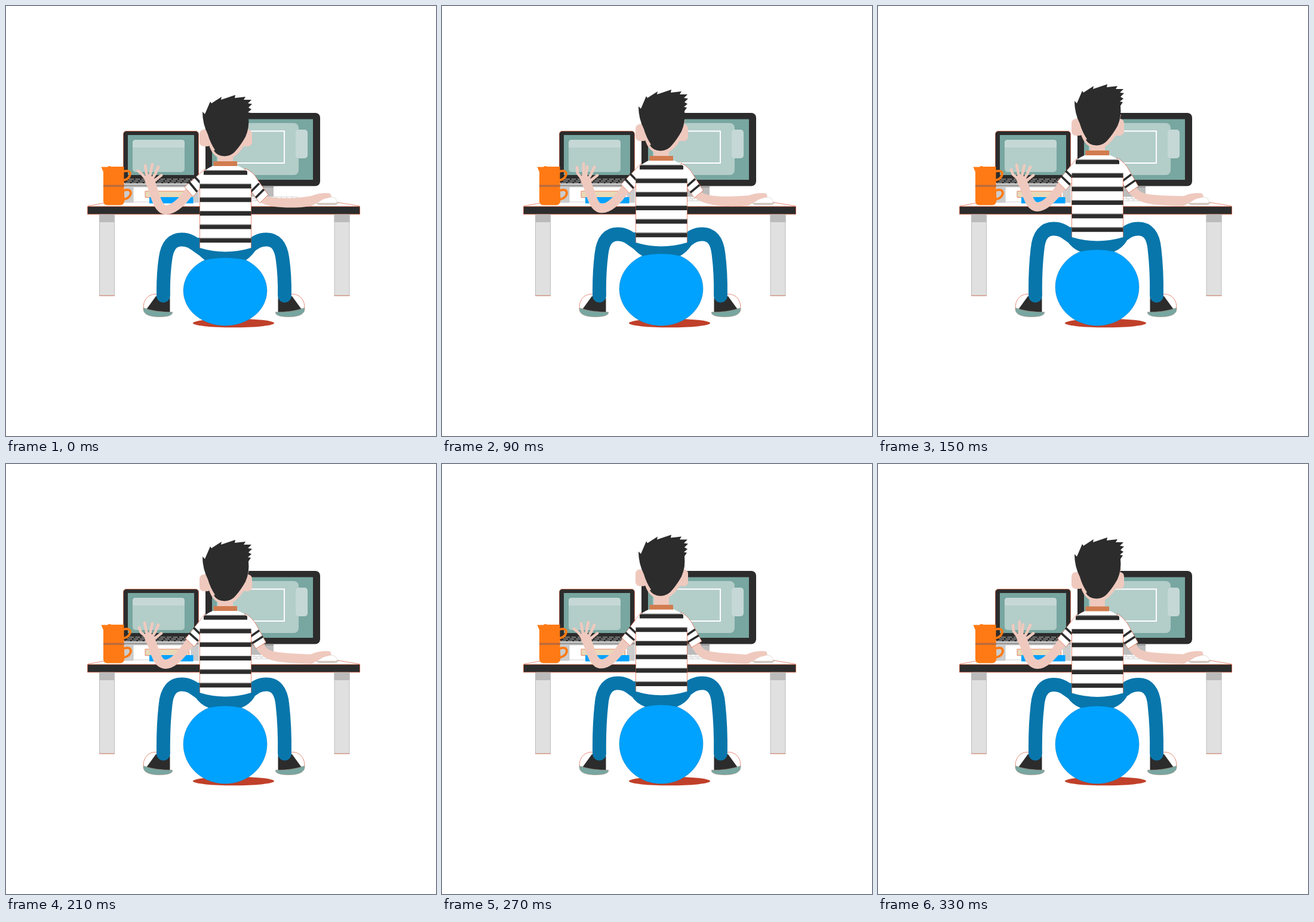
Animation, 720 px wide and 720 px high, one loop 0.36 s. Source, as an HTML page:

```html
<!DOCTYPE html>
<html lang="en">
<head>
<meta charset="utf-8">
<title>Desk bounce</title>
<style>
  html, body { margin: 0; width: 100%; height: 100%; overflow: hidden; background: #fff; }
  svg { display: block; width: 100vw; height: 100vh; }
  .ink { fill: #2c2c2c; }
  .skin { fill: #efc9be; }
  .teal { fill: #78a6a0; }
  .pane { fill: #b3cdc9; }
  .bar { fill: #c5d8d6; }
  .denim { fill: #0876ab; }
  .white { fill: #fff; }
  .rim { stroke: #dd5a3a; stroke-width: .7; }
  .line { fill: none; }
  .limb { fill: none; stroke: #efc9be; stroke-width: 15.4; }
  .leg { fill: none; stroke: #0876ab; stroke-width: 22.8; stroke-linecap: round; }
  .cuff { fill: none; stroke: #2c2c2c; stroke-width: 3.6; }
  .finger { fill: none; stroke: #efc9be; stroke-width: 4.7; stroke-linecap: round; stroke-linejoin: round; }
</style>
</head>
<body>
<svg viewBox="0 0 720 720">
  <defs>
    <g id="post">
      <path fill="#e0e0e0" stroke="#aaa" stroke-width=".7" d="M156.5 349H181.5V485H156.5Z"/>
      <path fill="#bbb" d="M156 349H182V362H156Z"/>
      <path class="line rim" d="M156 485H182"/>
    </g>
    <g id="shoe">
      <path class="white rim" d="M230.5 508C228 491 241 480 254 483L237 509Z"/>
      <path class="ink" d="M235 508L251 486L274.5 489V514Q255 515 235 508Z"/>
      <path fill="#78a6a0" stroke="#a58c7c" stroke-width=".6" d="M230 505.5Q252 513 278.5 512.5C280 518 270 520.5 258 520.5C241 520.5 229 517 230 505.5Z"/>
    </g>
    <path id="shirtShape" d="M349 267C339 270 329 277 324.5 285V405Q367 418 410.5 405V285C406 277 396 270 386 267Z"/>
    <clipPath id="shirtClip"><use href="#shirtShape"/></clipPath>
  </defs>

  <!-- monitor -->
  <rect class="ink" x="334" y="179" width="192" height="122.5" rx="8"/>
  <path class="teal" d="M345 189.5H514V291H345Z"/>
  <rect class="pane" x="353" y="196" width="137" height="87" rx="8"/>
  <rect class="bar" x="485" y="207" width="20" height="48" rx="5"/>
  <path class="line" stroke="#fff" stroke-width="1.9" d="M372 209.5H466V263H372Z"/>
  <path fill="#bbb" d="M409 301H448V320H409Z"/>
  <path fill="#999" d="M409 301H448V304H409Z"/>

  <!-- laptop -->
  <rect class="ink rim" x="196.5" y="209.5" width="126" height="88" rx="5"/>
  <path class="teal" d="M204 216H315V283H204Z"/>
  <rect class="pane" x="212" y="224" width="87" height="54" rx="5"/>
  <path class="bar" d="M212 237V229Q212 224 217 224H294Q299 224 299 229V237Z"/>
  <path class="line" stroke="#ddd" stroke-width=".9" stroke-dasharray="8 2.5" d="M206 290H318M203 293H321M200 296H322"/>
  <path fill="#ccc" d="M197 297H323V300H197Z"/>
  <path fill="#999" d="M197 299.5H323V302.5H197Z"/>

  <!-- stand and books -->
  <path fill="#ccc" d="M198 303H213V330H198ZM310 303H323V331H310Z"/>
  <path class="white" stroke="#bbb" stroke-width=".7" d="M213 303H310V328H213Z"/>

  <!-- desk -->
  <path class="white" d="M137 335L166 329.5H556L592 335Z"/>
  <path class="line rim" d="M137 335L164 330M556 329L592 335"/>
  <path class="ink rim" d="M136.5 335.7H592.5V348.7H136.5Z"/>
  <use href="#post"/>
  <use href="#post" x="393.5"/>
  <path fill="#e9d9b8" class="rim" d="M233 310H306.5V320.5H233Z"/>
  <path fill="#00a2ff" d="M240 320H313.5V330.5H240Z"/>

  <!-- keyboard and mouse -->
  <path fill="#ddd" d="M405 319H488L494 327H405Z"/>
  <path class="line" stroke="#fff" stroke-width="2" stroke-dasharray="7 2" d="M408 321H488M411 324.5H490"/>
  <path fill="#cfc3ba" d="M519 328H557Q557 333 549 333H527Q519 333 519 328Z"/>
  <path class="white" stroke="#d9cfc8" stroke-width=".7" d="M521 329Q526 320 543 320Q555 320 554 330H521Z"/>

  <!-- cups -->
  <g fill="none" stroke="#ff7a14" stroke-width="3.8">
    <path d="M196 277Q208 274 208 281Q207 290 196 292"/>
    <path d="M197 309Q209 305 209 314Q207 322 197 324"/>
  </g>
  <path fill="#ff7a14" d="M159.5 269.5H170Q173 267 176 269H197.5V300L198.5 325Q198 333.5 191 333.5H170Q163.5 333.5 163 327V278Z"/>
  <path fill="#bd6a3c" d="M163 299.5H198V303H163Z"/>

  <!-- ball and legs -->
  <ellipse cx="381" cy="531" rx="68" ry="7.3" fill="#c0402a"/>
  <use href="#shoe"/>
  <use href="#shoe" transform="matrix(-1 0 0 1 730 0)"/>
  <g id="legs">
    <path class="leg"/>
    <path class="leg" transform="matrix(-1 0 0 1 730 0)"/>
  </g>
  <ellipse id="ball" cx="367" rx="70" fill="#00a2ff" stroke="#1c86c4" stroke-width=".6"/>
  <path id="hips" class="denim"/>

  <!-- arms -->
  <path id="armL" class="limb"/>
  <path class="skin" d="M234 298L231 288Q232 283 238 282Q244 282 246 289L249 294L247 300L238 303Z"/>
  <path id="hand" class="finger"/>
  <path id="armR" class="skin"/>
  <path class="skin" d="M506 321C522 312 538 313 543 314L545 319.5C540 322 532 322 526 327L512 334.5Z"/>
  <path id="sleeveL" class="white rim"/>
  <path id="cuffL" class="cuff"/>
  <path id="sleeveR" class="white rim"/>
  <path id="cuffR" class="cuff"/>

  <!-- head -->
  <g id="head">
    <path class="skin" d="M355 246H380V274H355Z"/>
    <rect class="skin" x="324" y="207" width="20" height="28" rx="7"/>
    <rect class="skin" x="392" y="207" width="20" height="28" rx="7"/>
    <path class="skin" d="M336 208L340 233Q345 250 358 255H377Q391 248 399 233L407 200Z"/>
    <path class="ink" d="M329 177L333 181L342 160L344 163L361 152L360 157L384 149L383 154L401 152L398 157L411 157L405 163L412 164L406 170L411 173L405 178L410 179L406 185Q408 203 401 219Q393 233 385 242Q378 251 366 251.5Q353 251 348 242L350 241Q342 229 338 215Q329 197 329 177Z"/>
  </g>

  <!-- shirt -->
  <g id="shirt">
    <use href="#shirtShape" class="white"/>
    <path class="line rim" d="M324.5 303V405M410.5 303V405"/>
    <g clip-path="url(#shirtClip)" id="stripes"></g>
    <path fill="#d17c4f" d="M347.5 260H387V268H347.5Z"/>
  </g>
</svg>
<script>
const STEP = 30;
const rise = [0, 2, 4.7, 9, 13.3, 18, 20.3, 22, 23.4, 24.2, 23.4, 21.5];
const headRise = [0, 2, 4.7, 9, 13.3, 18, 20.3, 22, 27, 30.5, 29, 26];
const pose = [0, 0, 0, 1, 1, 2, 2, 2, 2, 0, 0, 1];
const thumb = "M246 294L253 289L260 283.5M245 289L250 281L255 269.5";
const fingers = [
  "M234 289L227 281L221 276M236 285L233 267M241 285L245 265",
  "M234 289L227 280L226 270M237 285L237 264M241 285L243 269",
  "M234 289L226 282L223 274M236 285L232 266M241 285L245 267"
].map(d => d + thumb);

// Each pair holds the low and the high pose.
const pairs = {
  armL: ["M308 309C291 335 276 341.3 268 341.3C254 341.3 250 318 241 291",
         "M309 296C288 327 276 334.6 267 334.6C253 334.6 250 315 241 291"],
  armR: ["M437 319C450 322 490 324 520 316L512 334.5C490 339 445 340 424 328Z",
         "M432 300C437 314 442 315 510 319L512 334.5C440 332 430 328 417 304Z"],
  sleeveL: ["M333 273L299 303L313 319L328 303Z", "M333 249L301 291L315 304.5L328 289Z"],
  cuffL: ["M306 294L320 311M315 285L330 301", "M307 282L322 295M314 273L329 287"],
  sleeveR: ["M400 272Q414 277 422 292L439 316L425 330L408 307Z",
            "M400 248Q414 256 421 271L435 297L418 307L408 291Z"],
  cuffR: ["M432 307L418 321M424 297L409 312", "M430 287L412 298M424 277L409 287"],
  leg: ["M263.5 485C263 455 265 437 267 423C270 401 279 391 294 391C315 391 320 406 345 416",
        "M263.5 485C263 450 265 420 267 402C269 377 279 366.8 294 366.8C315 366.8 320 382 345 392"],
  hips: ["M322 388H413L418 409Q411 419 402 425.5Q367 418 333 425.5Q324 419 316 409Z",
         "M322 364H413L416 388Q408 401 393 406.5Q367 400.5 340 406.5Q325 401 317 388Z"]
};

const $ = id => document.getElementById(id);
const slide = (id, y) => $(id).setAttribute("transform", `translate(0 ${-y})`);
const put = (el, d) => el.setAttribute("d", d);

function mix([a, b], k) {
  const end = b.match(/[\d.]+/g);
  let i = 0;
  return a.replace(/[\d.]+/g, n => (+n + (end[i++] - n) * k).toFixed(2));
}

$("stripes").innerHTML = Array.from({ length: 6 }, (_, i) => {
  const y = 275.3 + i * 22.7, inset = i ? 0 : 7;
  return `<path class="ink" d="M${324 + inset} ${y}H${411 - inset}V${y + 7.5}H${324 + inset}Z"/>` +
    `<path fill="#888" d="M${324 + inset} ${y - .5}H${411 - inset}V${y + .6}H${324 + inset}Z"/>`;
}).join("");

function draw(n) {
  const y = rise[n], k = y / 24.2;
  slide("shirt", y);
  slide("head", headRise[n]);
  const ry = 58.7 + 8.2 * k;
  $("ball").setAttribute("cy", 535.3 - ry);
  $("ball").setAttribute("ry", ry);
  for (const id of ["armL", "armR", "sleeveL", "sleeveR", "cuffL", "cuffR", "hips"]) put($(id), mix(pairs[id], k));
  for (const el of $("legs").children) put(el, mix(pairs.leg, k));
  put($("hand"), fingers[pose[n]]);
}

const start = performance.now();
function tick() {
  const t = Math.max(0, performance.now() - start);
  draw(Math.floor(t / STEP + .01) % rise.length);
  requestAnimationFrame(tick);
}
tick();
</script>
</body>
</html>
```
